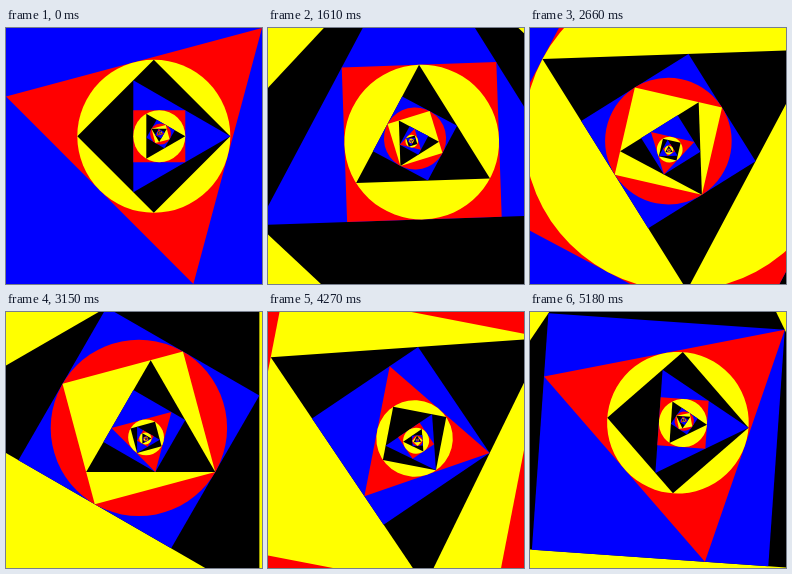
Recreate the animation shown at these times as an HTML page with a canvas. Size 256 by 256 pixels, loop 5250 ms.

```html
<!DOCTYPE html>
<html lang="en">
<head>
<meta charset="utf-8">
<title>Nested shapes</title>
<style>
html, body { margin: 0; width: 100%; height: 100%; overflow: hidden; background: #00f; }
canvas { display: block; width: 256px; height: 256px; }
</style>
</head>
<body>
<canvas id="stage" width="256" height="256"></canvas>
<script>
const SIZE = 256, MID = SIZE / 2;
const STEPS = 75, STEP_MS = 70;
const TURN = -300, ZOOM = 35;
const COLORS = ['#00f', '#f00', '#ff0', '#000'];
const ctx = document.getElementById('stage').getContext('2d');
const rad = deg => deg * Math.PI / 180;

// Number of corners (0 = circle) and direction of the leading corner, for one cycle.
const CYCLE = [
  [4, -45], [3, -45], [0, 0], [4, 0], [3, 0], [4, 45],
  [0, 0], [3, 0], [4, 165], [0, 0], [4, 210], [3, 210]
];

// Largest shape of the given kind inside its parent; r is the circumradius.
function fit(parent, n, deg) {
  let { x, y, r } = parent;
  const inner = parent.n ? r * Math.cos(Math.PI / parent.n) : r;
  const slide = (angle, d) => {
    x += d * Math.cos(rad(angle));
    y += d * Math.sin(rad(angle));
  };
  if (n === 0) {
    r = inner;
  } else if (parent.n === 4) {
    // triangle sharing one corner of a square
    const size = r * Math.SQRT2 / Math.cos(rad(15)) / Math.sqrt(3);
    slide(deg, r - size);
    r = size;
  } else if (parent.n === 3) {
    // square standing on one side of a triangle
    const side = r * 3 / (2 + Math.sqrt(3));
    slide(deg + 135, inner - side / 2);
    r = side / Math.SQRT2;
  }
  return { n, deg, x, y, r };
}

function build(cycles) {
  const list = [{ n: 4, deg: -45 - 300, x: 0, y: 0, r: 1 }];
  for (let i = 1; i < cycles * 12; i++) {
    const [n, deg] = CYCLE[i % 12];
    list.push(fit(list[i - 1], n, deg + 300 * (Math.floor(i / 12) - 1)));
  }
  const k = MID * Math.SQRT2 / list[12].r;
  return list.map(s => ({ ...s, x: s.x * k, y: s.y * k, r: s.r * k }));
}

const shapes = build(4);
const first = shapes[12], next = shapes[24];

function drawShape(s, color) {
  ctx.fillStyle = color;
  ctx.beginPath();
  if (s.n) {
    for (let i = 0; i < s.n; i++) {
      const a = rad(s.deg + i * 360 / s.n);
      ctx.lineTo(s.x + s.r * Math.cos(a), s.y + s.r * Math.sin(a));
    }
    ctx.closePath();
  } else {
    ctx.arc(s.x, s.y, s.r, 0, 2 * Math.PI);
  }
  ctx.fill();
}

function render(now) {
  const u = Math.floor(now / STEP_MS) % STEPS / STEPS;
  const zoom = Math.pow(ZOOM, u);
  ctx.setTransform(1, 0, 0, 1, 0, 0);
  // the inner square drifts to the middle while it grows and turns
  ctx.translate(MID + (next.x - first.x) * (1 - u), MID + (next.y - first.y) * (1 - u));
  ctx.rotate(rad(TURN * u));
  ctx.scale(zoom, zoom);
  ctx.translate(-next.x, -next.y);
  shapes.forEach((s, i) => drawShape(s, COLORS[i % 4]));
}

const start = performance.now();
function tick() {
  render(performance.now() - start);
  requestAnimationFrame(tick);
}
tick();
</script>
</body>
</html>
```
